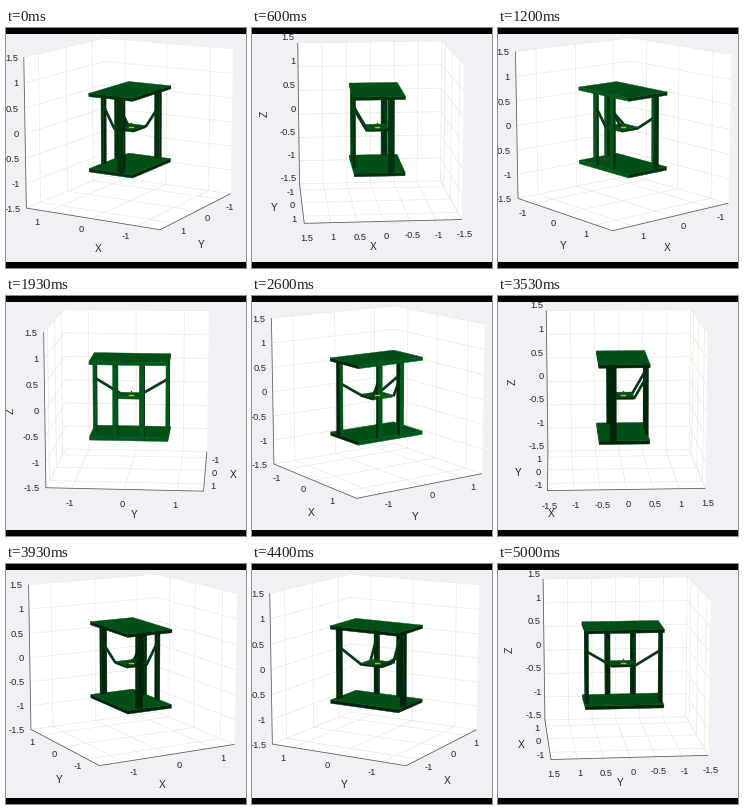
A matplotlib script for the animation above (5.07 s loop, 240 px wide and 240 px high).

```python
import itertools

import numpy as np
import matplotlib.pyplot as plt
from matplotlib.animation import FuncAnimation

SIZE, DPI = 240, 100
FRAMES, TICK = 195, 26          # short ticks, 5070 ms in all
STEPS, STEP_MS = 76, 200 / 3    # the view turns 15 times a second
PX = 72 / DPI

# Camera: fixed elevation and distance, orbiting azimuth
ELEV = np.radians(12)
DIST, FOCAL = 26, 1310
CX, CY = 124.5, 99.7
LIM = 1.5
COARSE = (-1, 0, 1)
FINE = (-1.5, -1, -0.5, 0, 0.5, 1, 1.5)

PAPER = (0.945, 0.945, 0.96)
INK = (0.15, 0.15, 0.15)
AXIS = (0.35, 0.35, 0.35)
GRID = (0.92, 0.92, 0.89)
GREEN = np.array([0.01, 0.41, 0.12])
ROD = (0.0, 0.23, 0.07)
LIGHT = np.array([0.75, 0.2, 0.63])

plt.rcParams["font.family"] = "Liberation Sans"
fig = plt.figure(figsize=(SIZE / DPI, SIZE / DPI), dpi=DPI, facecolor=PAPER)
ax = fig.add_axes([0, 0, 1, 1])


def azimuth(step):
    return np.interp(step, [0, 18, 29, 39, 53, 66, 75],
                     [210, 140, 94.5, 55, -3, -60, -95.5])


class Camera:
    def __init__(self, az):
        a = np.radians(az)
        s, c = np.sin(a), np.cos(a)
        se, ce = np.sin(ELEV), np.cos(ELEV)
        self.right = np.array([c, s, 0])
        self.up = np.array([-s * se, c * se, ce])
        self.look = np.array([s * ce, -c * ce, se])

    def depth(self, p):
        return np.asarray(p) @ self.look

    def __call__(self, p):
        p = np.asarray(p, float)
        k = FOCAL / (DIST - p @ self.look)
        return CX + k * (p @ self.right), CY - k * (p @ self.up)


def line(cam, pts, color, width, z):
    x, y = cam(pts)
    ax.plot(x, y, color=color, lw=width * PX, zorder=z,
            solid_capstyle="butt", solid_joinstyle="round")


def face(cam, pts, color, z):
    x, y = cam(pts)
    ax.fill(x, y, facecolor=color, edgecolor=color, lw=0.3, zorder=z)


def text(x, y, s, size=9.3, **kw):
    kw = {"ha": "center", "va": "center_baseline", "color": INK, **kw}
    ax.text(x, y, s, fontsize=size * PX, zorder=50, **kw)


def box(cam, center, half, z):
    center, half = np.array(center, float), np.array(half, float)
    for axis, sign in itertools.product(range(3), (-1, 1)):
        normal = np.zeros(3)
        normal[axis] = sign
        mid = center + normal * half
        if normal @ (cam.look * DIST - mid) <= 0:
            continue
        a, b = [i for i in range(3) if i != axis]
        quad = []
        for da, db in ((-1, -1), (1, -1), (1, 1), (-1, 1)):
            p = mid.copy()
            p[a] += da * half[a]
            p[b] += db * half[b]
            quad.append(p)
        face(cam, quad, GREEN * (0.35 + 0.65 * max(0, normal @ LIGHT)), z)


def draw_robot(cam):
    parts = []

    def add(center, draw):
        parts.append((cam.depth(center), draw))

    def add_box(center, half):
        add(center, lambda z: box(cam, center, half, z))

    def add_rod(p, q):
        add(np.add(p, q) / 2, lambda z: line(cam, [p, q], ROD, 2.7, z))

    for s in (-1, 1):
        add_box((-0.22, s * 0.73, 0), (0.06, 0.035, 0.73))
        add_box((0.465, s * 0.26, 0), (0.028, 0.05, 0.73))
        add_rod((-0.22, s * 0.72, 0.3), (-0.22, s * 0.22, 0))
        add_rod((0.46, s * 0.26, 0.43), (0.21, s * 0.26, -0.01))
    add_box((0, 0, 0), (0.21, 0.24, 0.022))

    box(cam, (0, 0, -0.765), (0.49, 0.77, 0.035), 10)
    parts.sort(key=lambda part: part[0])
    for n, (_, draw) in enumerate(parts):
        draw(11 + n)
    box(cam, (0, 0, 0.738), (0.49, 0.77, 0.032), 30)

    x, y = cam((0, 0, 0.02))
    ax.plot([x - 2, x + 2], [y, y], color=(0.75, 0.75, 0.1),
            lw=1.4 * PX, zorder=29)
    ax.plot([x], [y - 4.2], "s", color=(0.1, 0.25, 0.15), ms=1.3 * PX,
            mew=0, zorder=29)


def label_gap(theta):
    knots = [3, 30, 50, 87]
    return (np.interp(theta, knots, [2, 10.5, 10, 9]),
            np.interp(theta, knots, [14.5, 9.5, 9, 1.5]))


def name_gap(theta):
    knots = [4, 30, 40, 50, 60, 87]
    return (np.interp(theta, knots, [-10, -7, -5, 0, 4, 29]),
            np.interp(theta, knots, [24, 29, 31, 31, 33, 2.5]))


def draw_axes(cam, az):
    turn = int(np.floor(az / 90))
    phi = az - 90 * turn
    quarter = turn * np.pi / 2
    e1 = np.round([np.cos(quarter), np.sin(quarter), 0])
    e2 = np.array([-e1[1], e1[0], 0])

    def at(a, b, z):
        return a * e1 + b * e2 + np.array([0, 0, z])

    left, near, far, back = (at(a, b, -LIM) for a, b in
                             ((-LIM, -LIM), (LIM, -LIM), (LIM, LIM), (-LIM, LIM)))
    rise = np.array([0, 0, 2 * LIM])
    for quad in ([left, near, far, back],
                 [left, back, back + rise, left + rise],
                 [back, far, far + rise, back + rise]):
        face(cam, quad, "white", 0.5)

    ticks1 = COARSE
    ticks2 = FINE if phi > 82 else COARSE
    for t in ticks1:
        line(cam, [at(t, -LIM, -LIM), at(t, LIM, -LIM), at(t, LIM, LIM)], GRID, 0.8, 1)
    for t in ticks2:
        line(cam, [at(LIM, t, -LIM), at(-LIM, t, -LIM), at(-LIM, t, LIM)], GRID, 0.8, 1)
    for t in FINE:
        line(cam, [at(-LIM, -LIM, t), at(-LIM, LIM, t), at(LIM, LIM, t)], GRID, 0.8, 1)
    line(cam, [left + rise, left, near, far], AXIS, 0.8, 2)

    # Horizontal axes: the left one runs along e1, the right one along e2
    sides = ((e1, -1, phi, ticks1, lambda t: at(t, -LIM, -LIM)),
             (e2, 1, 90 - phi, ticks2, lambda t: at(LIM, t, -LIM)))
    for vec, side, theta, ticks, place in sides:
        dx, dy = label_gap(theta)
        for t in ticks:
            x, y = cam(place(t))
            text(x + side * dx, y + dy, f"{t * vec.sum() + 0.0:g}")
        dx, dy = name_gap(theta)
        x, y = cam(place(0))
        # A nearly head-on axis carries its name at the left end
        if side > 0 and theta < 4:
            dx = -75
        text(x + side * dx, y + dy, "X" if vec[0] else "Y", 10.2)

    # Vertical axis
    lift = np.clip((phi - 60) / 25, 0, 1)
    for t in FINE:
        x, y = cam(at(-LIM, -LIM, t))
        text(x - 6 + 3 * lift, y - 6 * lift, f"{t:g}", ha="right")
    x, y = cam(at(-LIM, -LIM, 0))
    text(x - 34, y, "Z", 10.2, rotation=90, va="center")


def update(i):
    ax.cla()
    ax.set_xlim(0, SIZE)
    ax.set_ylim(SIZE, 0)
    ax.axis("off")
    step = min(int((i + 1) * TICK / STEP_MS), STEPS - 1)
    az = azimuth(step)
    cam = Camera(az)
    draw_axes(cam, az)
    draw_robot(cam)
    for y0, y1 in ((0, 6), (234, SIZE)):
        ax.fill([0, SIZE, SIZE, 0], [y0, y0, y1, y1], color="black", lw=0, zorder=90)
    return []


anim = FuncAnimation(fig, update, frames=FRAMES, init_func=lambda: [],
                     interval=TICK, repeat=True, repeat_delay=0)
plt.show()
```
